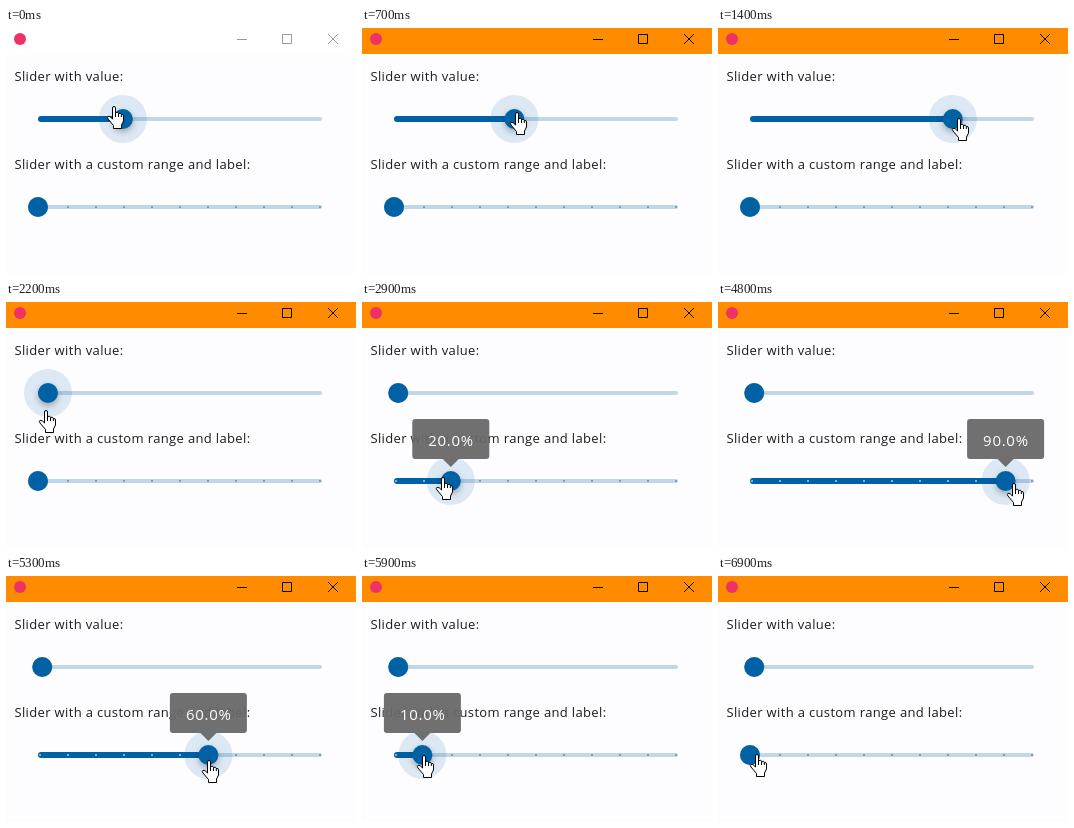
Write an HTML page that moves like this. It is 350 px wide and 246 px high and loops after 7000 ms.

```html
<!DOCTYPE html>
<html lang="en">
<head>
<meta charset="utf-8">
<title>Sliders</title>
<style>
  html, body { margin: 0; width: 100%; height: 100%; overflow: hidden; background: #fdfcff; }
  svg { display: block; width: 350px; height: 246px; }
  text { font-family: "Open Sans", "Noto Sans", sans-serif; }
  .caption { font-size: 13px; letter-spacing: .35px; fill: #1a1c1e; }
  .value { font-size: 15px; letter-spacing: .7px; fill: #fff; text-anchor: middle; }
  .track { fill: #c0d7e9; }
  .primary { fill: #0061a4; }
  .halo { fill: #0061a4; fill-opacity: .13; }
</style>
</head>
<body>
<svg viewBox="0 0 350 246">
  <rect width="350" height="246" fill="#fdfcff"/>
  <rect id="bar" width="350" height="26"/>
  <circle cx="14" cy="11" r="6" fill="#ee3167"/>
  <path id="buttons" fill="none" d="M231 11.5h10M276.5 6.5h9v9h-9zM322 6l10 10M332 6l-10 10"/>
  <text class="caption" x="8.5" y="53">Slider with value:</text>
  <text class="caption" x="8.5" y="141">Slider with a custom range and label:</text>
  <g id="sliders"></g>
  <g id="label">
    <path id="bubble" fill="#696969" fill-opacity=".95"/>
    <text id="value" class="value" y="144"></text>
  </g>
  <g id="cursor" fill="#fff" stroke="#000" stroke-linejoin="round">
    <path d="M5.5 2Q5.5.5 7 .5T8.5 2V6.5Q11.5 5.5 11.5 7.5 14 6.5 14.3 8.5 16.5 8 16.5 10V15L14.5 19V22.5H6.5V19.5L1 13Q-.5 11 1 10.3 3 9.8 5.5 13Z"/>
    <path fill="none" d="M8.5 6v5M11.5 7.5V11M14.3 8.5V11"/>
  </g>
</svg>
<script>
const LOOP = 7000, STEP = 100;
const LEFT = 32, RIGHT = 316, DIVISIONS = 10;
const GAP = (RIGHT - LEFT) / DIVISIONS;
const FINGER = 7;

// The pointer's turning points; everything else follows from them.
const stops = [
  { t: 0, x: 101, y: 78 },
  { t: 500, x: 111, y: 82 },
  { t: 1300, x: 259, y: 88 },
  { t: 2200, x: 33, y: 108 },
  { t: 2600, x: 27, y: 176 },
  { t: 4000, x: 248, y: 173 },
  { t: 4700, x: 307, y: 180 },
  { t: 5300, x: 196, y: 184 },
  { t: 6000, x: 32, y: 178 },
  { t: LOOP, x: 32, y: 178 }
];

const $ = id => document.getElementById(id);
const clamp = (v, lo, hi) => Math.min(hi, Math.max(lo, v));
const mix = (a, b, p) => a + (b - a) * p;
const ramp = (t, from, duration) => clamp((t - from) / duration, 0, 1);
const pulse = (t, from, to) => ramp(t, from, 200) - ramp(t, to, 200);

function pointer(t) {
  const i = Math.max(1, stops.findIndex(s => s.t >= t));
  const a = stops[i - 1], b = stops[i];
  const p = (t - a.t) / (b.t - a.t);
  return { x: mix(a.x, b.x, p), y: mix(a.y, b.y, p) };
}

function set(node, attrs) {
  for (const name in attrs) node.setAttribute(name, attrs[name]);
}

function add(parent, tag, attrs) {
  const node = document.createElementNS("http://www.w3.org/2000/svg", tag);
  set(node, attrs);
  return parent.appendChild(node);
}

function makeSlider(y, ticked) {
  const g = add($("sliders"), "g", {});
  add(g, "rect", { class: "track", x: LEFT, y: y - 2, width: RIGHT - LEFT, height: 4, rx: 2 });
  const active = add(g, "rect", { class: "primary", x: LEFT, y: y - 3, height: 6, rx: 3 });
  const ticks = [];
  for (let x = LEFT + 2; ticked && x < RIGHT; x += 28)
    ticks.push({ x, dot: add(g, "circle", { cx: x, cy: y, r: 1 }) });
  const halo = add(g, "circle", { class: "halo", cy: y, r: 24 });
  const knob = add(g, "circle", { class: "primary", cy: y, r: 10 });
  return (x, glow) => {
    set(active, { width: x - LEFT });
    for (const tick of ticks) set(tick.dot, { fill: tick.x < x ? "#a9cbe4" : "#5d8eb2" });
    set(halo, { cx: x, opacity: glow });
    set(knob, { cx: x });
    knob.style.filter = `drop-shadow(0 ${mix(.5, 3, glow)}px ${mix(.7, 3, glow)}px rgba(0, 0, 0, .28))`;
  };
}

const drawFirst = makeSlider(91, false);
const drawSecond = makeSlider(179, true);

function drawLabel(x, level, opacity) {
  const text = (level * 10).toFixed(1) + "%";
  const width = 31.5 + 9.1 * text.length;
  const left = clamp(x - width / 2, 8, 342 - width);
  const w = width - 6;
  set($("label"), { opacity });
  set($("bubble"), {
    d: `M${left + 3} 117h${w}q3 0 3 3v34q0 3 -3 3H${x + 8}L${x} 165L${x - 8} 157H${left + 3}q-3 0 -3 -3v-34q0 -3 3 -3z`
  });
  set($("value"), { x: left + width / 2 + .3 });
  $("value").textContent = text;
}

function draw(t) {
  const focused = t >= 100;
  set($("bar"), { fill: focused ? "#ff8c00" : "#fff" });
  set($("buttons"), { stroke: focused ? "#000" : "#999" });

  const hand = pointer(t);
  set($("cursor"), { transform: `translate(${Math.round(hand.x)} ${Math.round(hand.y)})` });

  // The first knob trails the pointer while dragged, then stays.
  const dragged = pointer(clamp(t, 500, 2600));
  drawFirst(10.3 + .96 * dragged.x, pulse(t, -200, 2200));

  const level = t < 2600 ? 0 : clamp(Math.round((hand.x + FINGER - LEFT) / GAP), 0, DIVISIONS);
  const x = LEFT + level * GAP;
  drawSecond(x, pulse(t, 2400, 6200));
  drawLabel(x, level, pulse(t, 2500, 6100));
}

const start = performance.now();
function frame() {
  const t = (performance.now() - start) % LOOP;
  draw(Math.floor(t / STEP) * STEP);
  requestAnimationFrame(frame);
}
frame();
</script>
</body>
</html>
```
